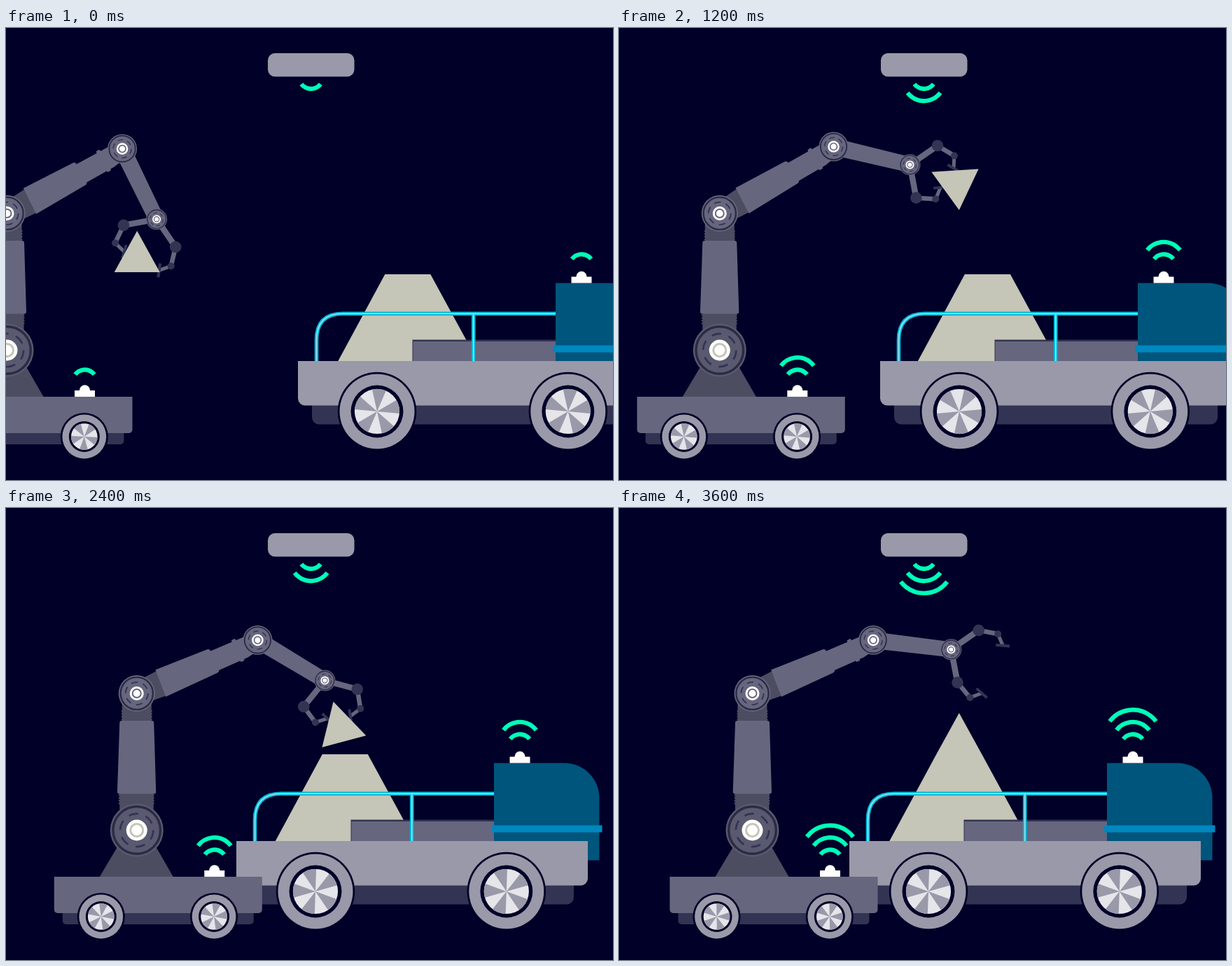
These frames come from a looping animation (867x646 px, 4 s). An HTML page with a canvas:

```html
<!DOCTYPE html>
<html lang="en">
<head>
<meta charset="utf-8">
<title>Robot loading a truck</title>
<style>
html, body { margin: 0; width: 100%; height: 100%; overflow: hidden; background: #000028; }
canvas { display: block; }
</style>
</head>
<body>
<canvas id="stage" width="867" height="646"></canvas>
<script>
const ctx = document.getElementById('stage').getContext('2d');
const NAVY = '#000028', DARK = '#333353', SHADE = '#4d4d62', STEEL = '#66667e';
const GRAY = '#9999a9', LIGHT = '#e5e5ea', SAND = '#c5c5b8', GREEN = '#00ffb9';
const RAD = Math.PI / 180;
const STEP = 400, LOOP = 4000;
const UPPER = 188.7, FORE = 112;

// Motion helpers
const ramp = (t, from, to) => Math.min(1, Math.max(0, (t - from) / (to - from)));
const smooth = (t, from, to) => (1 - Math.cos(Math.PI * ramp(t, from, to))) / 2;

function track(t, keys) {
  let value = keys[0][1];
  for (let i = 1; i < keys.length; i++) {
    const [t0, v0] = keys[i - 1], [t1, v1] = keys[i];
    value += (v1 - v0) * ramp(t, t0, t1);
  }
  return value;
}

function poseAt(t) {
  const lift = smooth(t, 2800, 3600);
  const step = t / STEP;
  return {
    cartX: track(t, [[0, 1.5], [400, 52], [1200, 143.8], [1600, 179.3], [2800, 190.5]]),
    truckX: 417 - 88 * smooth(t, 100, 2300),
    sway: 3.5 * Math.max(0, Math.sin(Math.PI * t / 2800)),
    upper: -29.3 - 1.1 * smooth(t, 0, 1200) + 6.6 * smooth(t, 1200, 2300),
    fore: 13 + 51 * (1 - ramp(t, 0, 1320)) ** 2 + 22.5 * smooth(t, 1200, 2900) - 28.6 * lift,
    hand: 118 - 101 * smooth(t, -250, 1450) + 55 * smooth(t, 1200, 2000) - 50 * lift,
    open: 0.45 * (1 - smooth(t, 0, 400)) + lift,
    waves: step < 5 ? 3 - Math.abs(step - 2) : 1 + Math.abs(step - 7),
    placed: t > 2900
  };
}

// Drawing helpers
function box(x, y, w, h, color, r = 0) {
  ctx.fillStyle = color;
  ctx.beginPath();
  ctx.roundRect(x, y, w, h, r);
  ctx.fill();
}

function disc(x, y, r, color) {
  ctx.fillStyle = color;
  ctx.beginPath();
  ctx.arc(x, y, r, 0, 7);
  ctx.fill();
}

function ring(x, y, r, width, color, dash = []) {
  ctx.strokeStyle = color;
  ctx.lineWidth = width;
  ctx.setLineDash(dash);
  ctx.beginPath();
  ctx.arc(x, y, r, 0, 2 * Math.PI);
  ctx.stroke();
  ctx.setLineDash([]);
}

function poly(points, color) {
  ctx.fillStyle = color;
  ctx.beginPath();
  points.forEach(([x, y]) => ctx.lineTo(x, y));
  ctx.closePath();
  ctx.fill();
}

function line(a, b, width, color) {
  ctx.strokeStyle = color;
  ctx.lineWidth = width;
  ctx.beginPath();
  ctx.moveTo(...a);
  ctx.lineTo(...b);
  ctx.stroke();
}

function local(x, y, deg, draw) {
  ctx.save();
  ctx.translate(x, y);
  ctx.rotate(deg * RAD);
  draw();
  ctx.restore();
}

const polar = ([x, y], len, deg) => [x + len * Math.cos(deg * RAD), y + len * Math.sin(deg * RAD)];

function wheel(x, y, r, turn) {
  const hub = r * 0.6, wedge = Math.PI / 5;
  disc(x, y, r + 2.7, NAVY);
  disc(x, y, r, GRAY);
  disc(x, y, r * 0.7, NAVY);
  disc(x, y, hub, LIGHT);
  ctx.fillStyle = GRAY;
  for (let i = 0; i < 5; i++) {
    const a = turn + i * 2 * wedge;
    ctx.beginPath();
    ctx.moveTo(x, y);
    ctx.arc(x, y, hub, a, a + wedge);
    ctx.fill();
  }
}

// dir 1 opens downward from a ceiling, -1 upward from a vehicle
function signal(x, y, dir, count) {
  ctx.strokeStyle = GREEN;
  ctx.lineWidth = 6.2;
  const mid = dir * Math.PI / 2;
  for (let i = 0; i < count; i++) {
    const r = 20.3 + 12.2 * i;
    ctx.beginPath();
    ctx.arc(x, y + dir * (17.4 * i - r), r - 3.1, mid - 0.92, mid + 0.92);
    ctx.stroke();
  }
}

function beacon(x, y, gap, waves) {
  box(x - 14.5, y - 9, 29, 9, '#fff');
  box(x - 7.5, y - 16.8, 15, 10, '#fff', [7.5, 7.5, 0, 0]);
  signal(x, y - gap, -1, waves);
}

function joint([x, y], r, core) {
  const big = r > 30;
  disc(x, y, r, big ? '#59596f' : STEEL);
  ring(x, y, r * 0.89, r * 0.09, '#2b2b45');
  ring(x, y, r * 0.62, Math.max(1, r * 0.07), DARK, [r * 0.36, r * 0.29]);
  disc(x, y, core, '#fff');
  ring(x, y, core * 0.6, core * 0.2, big ? SAND : STEEL);
}

function rail(x) {
  for (const [width, color] of [[5.6, '#00b8da'], [1.6, '#9fe8f0']]) {
    ctx.strokeStyle = color;
    ctx.lineWidth = width;
    ctx.beginPath();
    ctx.moveTo(x + 26.5, 476);
    ctx.lineTo(x + 26.5, 446);
    ctx.bezierCurveTo(x + 26.5, 420, x + 40, 408.2, x + 64, 408.2);
    ctx.lineTo(x + 368, 408.2);
    ctx.moveTo(x + 250.7, 409);
    ctx.lineTo(x + 250.7, 476);
    ctx.stroke();
  }
}

function truck(x, sway, waves) {
  const mid = x + 156.8 - sway;
  poly([[mid - 32.5, 352], [mid + 32.5, 352], [mid + 100, 476], [mid - 99.5, 476]], SAND);
  box(x + 163.5, 445.5, 206, 31, DARK);
  box(x + 164.5, 448, 205, 28, STEEL);
  rail(x);
  box(x + 368, 364.5, 150.5, 139, '#00557c', [0, 50, 0, 0]);
  box(x + 20, 530, 462, 36.5, DARK, [0, 0, 10, 10]);
  box(x, 476, 502, 63.5, GRAY, [0, 0, 10, 10]);
  box(x + 364, 453.5, 158.5, 10, '#0087be');
  for (const dx of [113, 385.8]) wheel(x + dx, 548, 53.5, x / 54 + 0.54);
  beacon(x + 405, 364.5, 44.3, waves);
}

function cart(x, waves) {
  box(x - 106, 570, 273, 25, DARK, [0, 0, 5, 5]);
  box(x - 118, 527, 297, 52, STEEL, [0, 0, 5, 5]);
  for (const dx of [-51, 110.3]) wheel(x + dx, 584, 31.4, x / 32);
  beacon(x + 111, 527, 41.7, waves);
}

function mast(x) {
  poly([[x - 53, 527], [x - 25, 480], [x + 25, 480], [x + 52, 527]], SHADE);
  box(x - 24.5, 405, 48.5, 40, SHADE);
  box(x - 21, 270, 42, 38, SHADE);
  for (let i = 0; i < 4; i++) {
    box(x - 26, 409 + i * 4, 51, 2.5, SHADE, 1);
    box(x - 22, 289 + i * 4, 44, 2.5, SHADE, 1);
  }
  ctx.fillStyle = ctx.strokeStyle = STEEL;
  ctx.lineWidth = 6;
  ctx.lineJoin = 'round';
  ctx.beginPath();
  ctx.moveTo(x - 21.5, 307);
  ctx.lineTo(x + 21.5, 307);
  ctx.lineTo(x + 24.5, 405.5);
  ctx.lineTo(x - 24.8, 405.5);
  ctx.closePath();
  ctx.fill();
  ctx.stroke();
  joint([x, 460.5], 38, 15);
}

function upperArm([x, y], deg) {
  local(x, y, deg, () => {
    poly([[10, -16], [40, -18], [40, 20], [10, 18]], SHADE);
    poly([[115, -13], [184, -12], [184, 14], [166, 17], [115, 17]], STEEL);
    box(154, -15, 6, 34, STEEL, 1);
    ctx.fillStyle = STEEL;
    ctx.beginPath();
    ctx.moveTo(38, -20);
    ctx.lineTo(117, -17);
    ctx.quadraticCurveTo(121, -17, 121, -13);
    ctx.lineTo(121, 16);
    ctx.quadraticCurveTo(121, 19.5, 117, 19.5);
    ctx.lineTo(36, 21);
    ctx.fill();
  });
}

function finger(wrist, angles, plateTurn) {
  const knuckle = polar(wrist, 48, angles[0]);
  const bend = polar(knuckle, 28, angles[1]);
  const tip = polar(bend, 18, angles[2]);
  const plate = angles[2] + plateTurn;
  line(wrist, knuckle, 8.5, STEEL);
  line(knuckle, bend, 6.5, STEEL);
  line(bend, tip, 5, STEEL);
  line(polar(tip, 10, plate), polar(tip, -10, plate), 4, DARK);
  disc(...knuckle, 8.3, DARK);
  disc(...bend, 5, DARK);
}

function claw(wrist, hand, open) {
  const left = 47 * open, right = 20 * Math.min(1, open * 2);
  finger(wrist, [hand + 57, hand - 18.5 + left, hand - 90 + left], 62);
  finger(wrist, [hand - 57, hand + 8.7 - right, hand + 71 - right * 1.3], -62);
}

function cargoTip([x, y], deg) {
  local(x, y, deg, () => poly([[0, 0], [32.5, 59], [-32.5, 59]], SAND));
}

function draw(time) {
  const t = Math.floor(time / STEP) * STEP % LOOP;
  const { cartX, truckX, sway, upper, fore, hand, open, waves, placed } = poseAt(t);
  const shoulder = [cartX, 265];
  const elbow = polar(shoulder, UPPER, upper);
  const wrist = polar(elbow, FORE, fore);

  ctx.fillStyle = NAVY;
  ctx.fillRect(0, 0, 867, 646);
  box(374, 36, 123.5, 33.5, GRAY, 10);
  signal(435.6, 90, 1, waves);
  truck(truckX, sway, waves);
  cart(cartX, waves);
  mast(cartX);

  claw(wrist, hand, open);
  if (placed) cargoTip([truckX + 156.8, 293], 0);
  else cargoTip(polar(wrist, 32.5, hand - 4 + 90 * open), hand - 87 - 57 * open);

  upperArm(shoulder, upper);
  local(...elbow, fore, () => poly([[0, -12], [FORE, -11], [FORE, 11], [0, 12]], STEEL));
  joint(shoulder, 26, 10);
  joint(elbow, 21, 8.3);
  joint(wrist, 15, 6);
}

let start;
function tick(now) {
  start ??= now;
  draw(now - start);
  requestAnimationFrame(tick);
}
draw(0);
requestAnimationFrame(tick);
</script>
</body>
</html>
```
